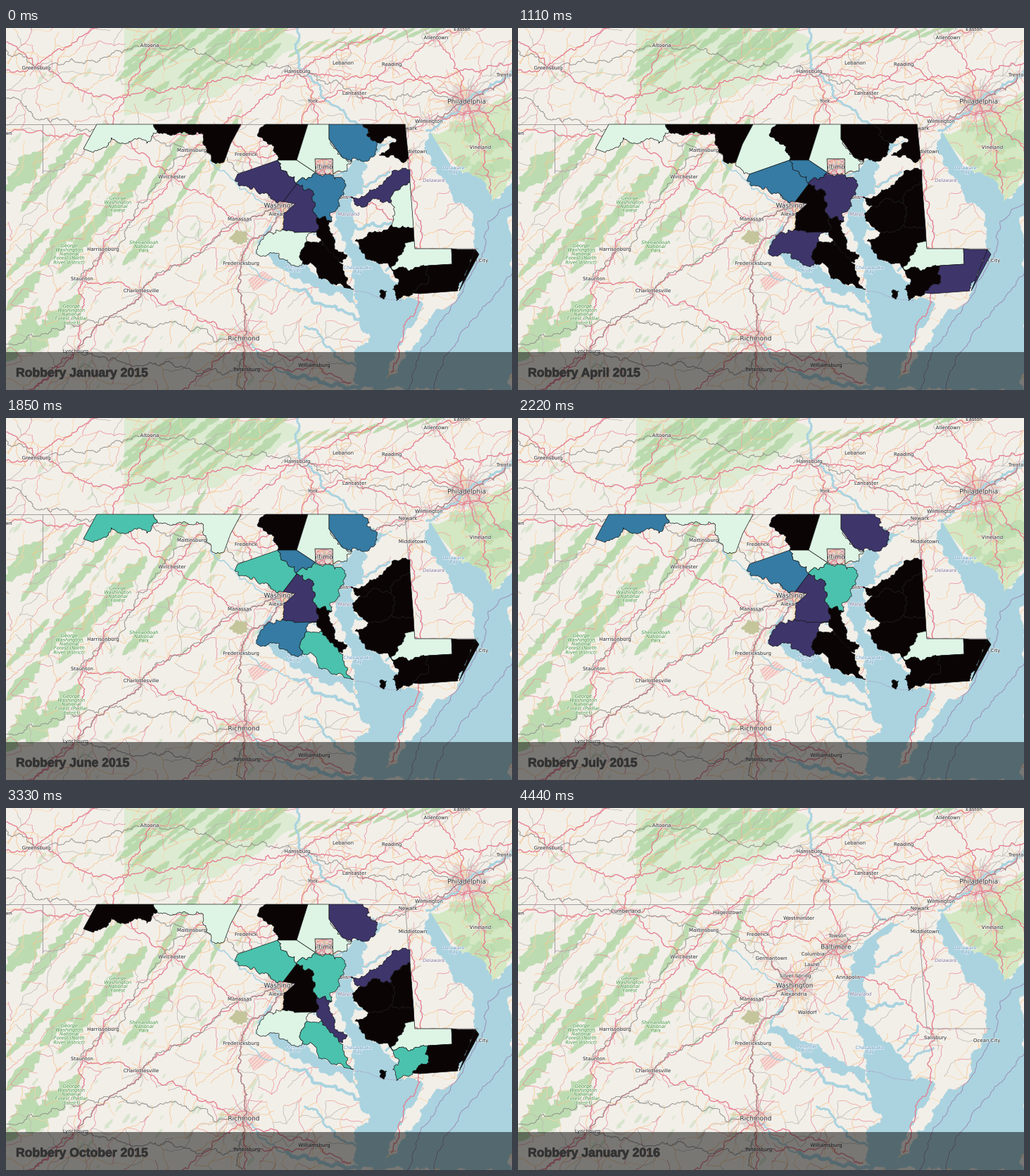
A matplotlib script that plays this animation: 719 px wide and 515 px high, repeating every 4810 ms.

```python
import math
import random
import matplotlib.pyplot as plt
from matplotlib.animation import FuncAnimation
from matplotlib.collections import LineCollection
from matplotlib.patches import Polygon, Rectangle
from matplotlib.patheffects import withStroke

W, H, DPI = 719, 515, 100
PX = 72 / DPI
LAND, WATER, WOOD = "#f2efe9", "#aad3df", "#b4d8a8"
FILL = {"K": "#0b0405", "P": "#3e356b", "B": "#357ba3",
        "T": "#4bc2ad", "L": "#def5e5"}

fig = plt.figure(figsize=(W / DPI, H / DPI), dpi=DPI, facecolor=LAND)
ax = fig.add_axes([0, 0, 1, 1])
ax.set(xlim=(0, W), ylim=(H, 0))
ax.axis("off")


def rough(p, q, amp, step=3):
    """Fractal line from p to q; a shared edge gives the same line both ways."""
    a, b = sorted((p, q))
    rng = random.Random(f"{a}{b}")

    def split(u, v):
        dx, dy = v[0] - u[0], v[1] - u[1]
        size = math.hypot(dx, dy)
        if size < step:
            return [v]
        k = rng.uniform(-amp, amp) * min(1, 22 / size)
        m = ((u[0] + v[0]) / 2 - dy * k, (u[1] + v[1]) / 2 + dx * k)
        return split(u, m) + split(m, v)

    pts = [a] + split(a, b)
    return pts if p == a else pts[::-1]


def point(word):
    return tuple(float(v) for v in word.split(","))


def trace(stops, amp):
    out = [stops[0]]
    for p in stops[1:]:
        out += rough(out[-1], p, amp)[1:]
    return out


def area(pts, color, z, **kw):
    return ax.add_patch(Polygon(pts, closed=True, fc=color, zorder=z, **kw))


def land(spec, color, z, amp=0.26):
    area(trace([point(w) for w in spec.split()], amp), color, z, lw=0)


def line(stops, color, width, z, amp=0.1, **kw):
    x, y = zip(*trace(stops, amp))
    ax.plot(x, y, color=color, lw=width * PX, zorder=z, **kw)


def blob(x, y, r, color, z, alpha):
    rng = random.Random(f"{x},{y}")
    pts = []
    for i in range(28):
        a, d = i * math.tau / 28, r * rng.uniform(0.72, 1.15)
        pts.append((x + d * math.cos(a), y + 0.8 * d * math.sin(a)))
    area(pts, color, z, alpha=alpha, lw=0)


def ridge(x1, y1, x2, y2, w, alpha=0.85):
    """Long wooded strip with uneven sides."""
    rng = random.Random(f"{x1},{y1},{x2}")
    dx, dy = x2 - x1, y2 - y1
    size = math.hypot(dx, dy)
    n = max(6, int(size / 5))
    sides = [], []
    for i in range(n + 1):
        t = i / n
        for side, sign in zip(sides, (1, -1)):
            d = sign * w / 2 * math.sin(math.pi * t) ** 0.5 * rng.uniform(0.45, 1.2)
            side.append((x1 + dx * t - dy / size * d, y1 + dy * t + dx / size * d))
    area(sides[0] + sides[1][::-1], WOOD, 2, alpha=alpha, lw=0)


# place names and where they stand
SMALL = """Greensburg 43 57;Altoona 204 25;Harrisburg 414 62;Lebanon 479 50
Reading 548 52;Lancaster 495 93;Allentown 611 14;Easton 648 2;Trenton 710 67
York 436 104;Wilmington 601 133;Newark 571 143;Middletown 578 176;Vineland 674 170
Cumberland 153 147;Hagerstown 298 149;Martinsburg 264 174;Frederick 341 180
Westminster 399 157;Towson 454 182;Columbia 419 208;Laurel 418 223
Germantown 360 214;Silver Spring 394 239;Alexandria 392 265;Manassas 332 272
Annapolis 469 241;Waldorf 411 291;Winchester 236 212;Harrisonburg 138 315
Staunton 108 357;Charlottesville 192 374;Fredericksburg 334 335;Lynchburg 99 460
Petersburg 342 486;Williamsburg 438 480;Salisbury 593 327;Ocean City 666 331
Morgantown -13 150"""
BIG = "Philadelphia 655 105;Baltimore 452 198;Washington 393 253;Richmond 338 442"


def gazetteer(text):
    rows = (row.rsplit(" ", 2) for row in text.replace("\n", ";").split(";"))
    return {name: (float(x), float(y)) for name, x, y in rows}


towns, cities = gazetteer(SMALL), gazetteer(BIG)
spots = {**towns, **cities}


def stops(route):
    return [point(w) if "," in w else spots[w] for w in route.split()]


# woodland
land("168,0 385,0 420,22 340,78 240,118 168,126", "#dcebd2", 1, 0.15)
land("600,150 640,142 719,90 719,212 690,246 650,207", "#d3e8c3", 1, 0.2)
wild = random.Random(12)
for k in range(30):
    t, u = (k + 0.5) / 30, wild.random()
    x, y = 172 + 205 * t, 10 + u * (105 - 75 * t)
    r = wild.uniform(22, 42)
    ridge(x - r * 0.6, y + r * 0.5, x + r, y - r * 0.75, wild.uniform(7, 14))
for k in range(9):
    x = 400 + 24 * k
    ridge(x, 42 - 4 * k, x + 38, 18 - 3 * k, 7)
for k in range(9):
    blob(640 + 9 * k, 160 + wild.uniform(-20, 45), wild.uniform(9, 18), WOOD, 2, 0.6)
for strip in [
        (0, 232, 52, 175, 34), (20, 262, 110, 150, 18), (0, 355, 62, 285, 15),
        (85, 250, 172, 150, 15), (48, 340, 120, 245, 28), (75, 350, 150, 248, 20),
        (138, 270, 200, 196, 27), (165, 338, 242, 248, 20), (200, 240, 285, 100, 13),
        (240, 250, 285, 185, 11), (290, 222, 330, 125, 12), (0, 402, 50, 345, 22),
        (0, 475, 48, 395, 30), (28, 462, 108, 378, 36)]:
    ridge(*strip)
for _ in range(150):
    x, y = wild.uniform(0, 360), wild.uniform(60, 515)
    r = wild.uniform(2, 13)
    ridge(x, y, x + r, y - r * 1.3, r * 0.55, alpha=0.4)
blob(332, 298, 14, "#c5c59c", 3, 1)
area([(344, 358), (366, 346), (380, 356), (352, 374)], "#f8dcd7", 3, ec="#efb9b4",
     hatch="//////", lw=0.3)

# minor roads, denser around towns
ROADS = ["#f8c58c", "#f8c58c", "#fad7a8", "#f3a49c", "#e98b9b", "#bdb8b4"]
REACH = {"Philadelphia": 34, "Washington": 27, "Baltimore": 22, "Richmond": 22}
CELL = 21
rng = random.Random(21)
nodes = {(i, j): (i * CELL + rng.uniform(-9, 9), j * CELL + rng.uniform(-9, 9))
         for i in range(-1, 37) for j in range(-1, 27)}
paths, tints = [], []


def minor(p, q):
    paths.append(rough(p, q, 0.16, 4))
    tints.append(rng.choice(ROADS))


for (i, j), p in nodes.items():
    for di, dj, chance in ((1, 0, 0.5), (0, 1, 0.42), (1, -1, 0.34)):
        q = nodes.get((i + di, j + dj))
        if q and rng.random() < chance:
            minor(p, q)
for name, (x, y) in spots.items():
    r = REACH.get(name, 8)
    blob(x, y, r, "#ddd6d2", 3, 0.7)
    for k in range(r):
        a, d = k * math.tau / r + rng.uniform(-0.2, 0.2), (r + 10) * rng.uniform(0.6, 1.4)
        minor((x, y), (x + d * math.cos(a), y + d * math.sin(a)))
ax.add_collection(LineCollection(paths, colors=tints, linewidths=0.75 * PX, zorder=4))

# open water
land("600,143 595,165 612,200 632,235 662,262 668,315 645,375 600,415 560,478 "
     "540,515 719,515 719,212 690,247 670,213 632,195", WATER, 5)
land("530,163 550,160 513,185 505,210 508,235 490,248 500,285 492,305 535,344 "
     "556,362 558,386 590,388 568,430 546,475 538,515 502,515 495,462 518,440 "
     "503,425 495,372 480,318 466,280 468,250 480,205 492,190", WATER, 5)
land("391,258 366,296 360,310 388,322 400,330 432,342 465,362 494,372 500,395 "
     "455,378 395,345 354,322 357,305", WATER, 5)
for route, width in [
        ("415,0 416,56 455,104 522,158", 3), ("598,146 660,100 719,62", 3.2),
        ("335,336 410,372", 1.6), ("410,372 450,394 512,420", 4),
        ("340,446 400,490", 2), ("400,490 500,512", 5), ("425,425 500,486", 3),
        ("480,205 462,212", 3), ("468,300 437,293", 2), ("500,286 546,278", 4),
        ("508,225 545,205", 3), ("540,345 568,310", 3), ("558,362 590,342", 3),
        ("390,262 327,220 290,188", 1.6)]:
    line(stops(route), WATER, width, 5, 0.24)

# trunk roads, rails and borders
for route in """340,515 Petersburg Richmond Fredericksburg Alexandria Washington Laurel Baltimore 520,165 Newark Wilmington Philadelphia Trenton
30,515 Lynchburg Staunton Harrisonburg Winchester Martinsburg Hagerstown Harrisburg 540,0
Staunton Charlottesville Richmond Williamsburg 490,505
0,60 Greensburg 140,95 330,72 Harrisburg 580,75 719,50
Morgantown Cumberland Hagerstown Frederick Baltimore
Towson York Harrisburg
Frederick Germantown Washington
Washington Manassas Winchester
Manassas Charlottesville Lynchburg 40,515
0,20 Greensburg 130,0
Middletown Salisbury 588,390 548,490
Baltimore Annapolis 535,258 Salisbury
Wilmington 700,110 719,100
Allentown Philadelphia Vineland 688,235
Reading Philadelphia 719,175
Lancaster Reading Allentown Easton
York Lancaster Wilmington
Frederick Westminster York
Richmond 250,515
Petersburg Williamsburg
Altoona Cumberland Winchester""".split("\n"):
    line(stops(route), "#e6798c", 1.25, 6, 0.25)
for name, (x, y) in cities.items():
    r = REACH[name] * 0.6
    ring = [(x + r * math.cos(k / 5), y + 0.82 * r * math.sin(k / 5)) for k in range(32)]
    area(ring, "none", 6, ec="#e6798c", lw=0.9 * PX)
for route in """0,100 Cumberland Martinsburg Germantown Washington
336,515 Richmond Fredericksburg Alexandria Baltimore Wilmington Philadelphia Trenton
0,450 150,412 Richmond
Lynchburg Charlottesville Manassas Washington
0,30 Greensburg Altoona Harrisburg Lancaster Philadelphia
Martinsburg Staunton
Lynchburg Petersburg""".split("\n"):
    line(stops(route), "#8e8a88", 0.9, 6, 0.3)
for route in ("0,137 567,137", "567,137 581,314 671,314", "52,137 52,206"):
    line(stops(route), "#999397", 0.9, 6, 0)
line(stops("52,206 112,174"), "#a89fa8", 0.8, 6, 0.3)
for route in ("719,350 672,405 632,458 608,515",
              "719,250 685,275 679,318 640,388 590,455 570,515"):
    line(stops(route), "#9c8fb8", 1, 6, 0.15)
line(stops("494,374 562,388"), "#a99dc0", 0.8, 6, 0.1, ls="--")

# labels
HALO = [withStroke(linewidth=1.4 * PX, foreground="#ffffffb0")]


def label(x, y, text, size=7, color="#3c3c3c", **kw):
    ax.text(x, y, text, size=size * PX, color=color, ha="center", va="center",
            family="DejaVu Sans", zorder=7, path_effects=HALO, clip_on=True, **kw)


for group, size in ((towns, 7), (cities, 9)):
    for name, (x, y) in group.items():
        label(x, y, name, size)
GW = "George\nWashington\nNational\nForest"
PARK, SEA, STATE = "#4f9a4a", "#6d9fc4", "#8d80a3"
for x, y, name, color in [
        (159, 251, GW, PARK), (90, 322, GW + " (North\nRiver district)", PARK),
        (93, 408, GW + " (Pedlar\ndistrict)", PARK),
        (196, 311, "Shenandoah\nNational\nPark", PARK),
        (500, 344, "Chesapeake\nBay", SEA), (411, 342, "Potomac\nRiver", SEA),
        (636, 202, "Delaware\nBay", SEA), (487, 265, "Maryland", STATE),
        (608, 217, "Delaware", STATE)]:
    label(x, y, name, 6.6, color, style="italic", linespacing=0.95)


# counties: corners are letters, a ~ makes the edge to the next corner ragged
def corners(text):
    return {w[0]: point(w[1:]) for w in text.split()}


def outline(sheet, spec):
    out, ragged = [], False
    for c in spec:
        if c == "~":
            ragged = True
            continue
        p = sheet[c]
        out += rough(out[-1], p, 0.28)[1:] if ragged else [p]
        ragged = False
    return area(out, "k", 8, ec="#15181a", lw=0.7 * PX)


NORTH = corners(
    "a129,137 b210,137 c215,148 d200,164 e160,163 f150,156 g124,177 h110,172 "
    "i334,137 j319,165 k310,190 l298,193 m288,178 n280,151 o245,149 p369,137 "
    "q357,152 r378,166 s386,188 t329,208 u325,217 w413,222 x429,137 y413,188 "
    "z459,137 A459,158 B478,184 C492,189 D484,204 E465,208 F464,186 G439,186 "
    "H440,206 I507,137 J528,163 K525,176 L503,187 M567,137 N572,186 O530,181 "
    "P555,159 Q400,208 R394,247 S380,245 T341,224 U438,236 V442,270")
MIDDLE = corners(
    "w413,222 H440,206 R394,247 U438,236 V442,270 W441,290 X410,291 Y392,287 "
    "Z398,262 o411,250 a478,214 b480,237 c460,264 d463,275 e466,300 f485,325 "
    "g478,334 h450,305 i425,306 j479,337 k494,372 l455,357 m454,310 n421,335 "
    "p400,330 q388,321 r362,325 s366,296")
EAST = corners(
    "a574,202 b574,219 c547,248 d524,243 e508,255 f517,230 g490,240 h548,280 "
    "i515,291 j493,270 k579,284 l567,306 n556,327 o547,341 p518,330 q496,303 "
    "r580,303 s531,374 t541,374 u537,386 v581,314 w633,314 x634,336 y600,338 "
    "z601,362 A578,377 B555,388 C556,356 D642,315 E667,315 F642,374 G588,378 "
    "H672,322 I644,374")
SHAPES = [
    (NORTH, "ab~c~d~e~f~gh"), (NORTH, "bijk~l~m~n~o~c~b"), (NORTH, "ip~q~r~st~kj"),
    (NORTH, "pxys~r~q~p"), (NORTH, "xzA~B~C~D~EFGHy"), (NORTH, "zI~J~K~L~BA"),
    (NORTH, "IMN~O~P~J~I"), (NORTH, "syH~w~Q~s"), (NORTH, "uts~Q~wR~S~T~u"),
    (MIDDLE, "w~U~V~WX~Y~ZoR"), (MIDDLE, "w~H~a~b~c~d~V~U~w"),
    (MIDDLE, "V~d~e~f~g~h~W~V"), (MIDDLE, "WX~Y~s~r~q~p~n~i~W"),
    (MIDDLE, "i~m~j~k~l~n~i"), (EAST, "ab~c~d~e~g~f~a"), (EAST, "d~c~h~i~j~e~d"),
    (EAST, "bk~h~c~b"), (EAST, "i~h~krl~n~o~p~q~i s~t~u~s"),
    (EAST, "lrvwxy~o~n~l"), (EAST, "y~z~A~B~C~o~y"), (EAST, "yxwDE~FGA~z~y EHI"),
]
shapes = [[outline(sheet, part) for part in spec.split()] for sheet, spec in SHAPES]
box = ax.add_patch(Rectangle((439, 186), 25, 22, fc="none", ec="#666666",
                             lw=0.8 * PX, zorder=8))

# one letter a county, - for no data
MONTHS = [
    ("January 2015", "LK-KLBKLPPBKLKP-LKLKK"),
    ("February 2015", "LK-KLPKLBPPKLKKKKKLKK"),
    ("March 2015", "LKLKLPKBBKPKPKKKKKLKK"),
    ("April 2015", "LKLKLKKBBKPKPKKKKKLKP"),
    ("May 2015", "TL-KLB-BTPPKBKKKKKLKP"),
    ("June 2015", "TL-KLB-BTPTKBTKKKKLKK"),
    ("July 2015", "BL-KLP-LBPTKPKKKKKLKK"),
    ("August 2015", "BL-KLP-LBPLKPKLKKKLLK"),
    ("September 2015", "KL-KLP-LBPLKLKPKKKLLK"),
    ("October 2015", "KL-KLP-LTKTPLTPKKKLTK"),
    ("November 2015", "KL-KLPKLBPLKLKKKKKLKK"),
    ("December 2015", "KL-KLPKBBPLKLKK-KKLKP"),
    ("January 2016", "-" * 21),
]

ax.add_patch(Rectangle((0, 461), W, H - 461, fc="black", alpha=0.5, lw=0, zorder=9))
title = ax.text(14, 496, "", size=17.6 * PX, family="Liberation Sans", weight="bold",
                color="#333333", zorder=10,
                path_effects=[withStroke(linewidth=0.8 * PX, foreground="#333333")])


def draw(n):
    month, codes = MONTHS[n]
    title.set_text("Robbery " + month)
    for parts, code in zip(shapes, codes):
        for part in parts:
            part.set_visible(code in FILL)
            part.set_facecolor(FILL.get(code, "none"))
    box.set_visible(codes.strip("-") != "")
    return [title]


anim = FuncAnimation(fig, draw, frames=len(MONTHS), interval=370, repeat=True,
                     repeat_delay=0, blit=False)
plt.show()
```
